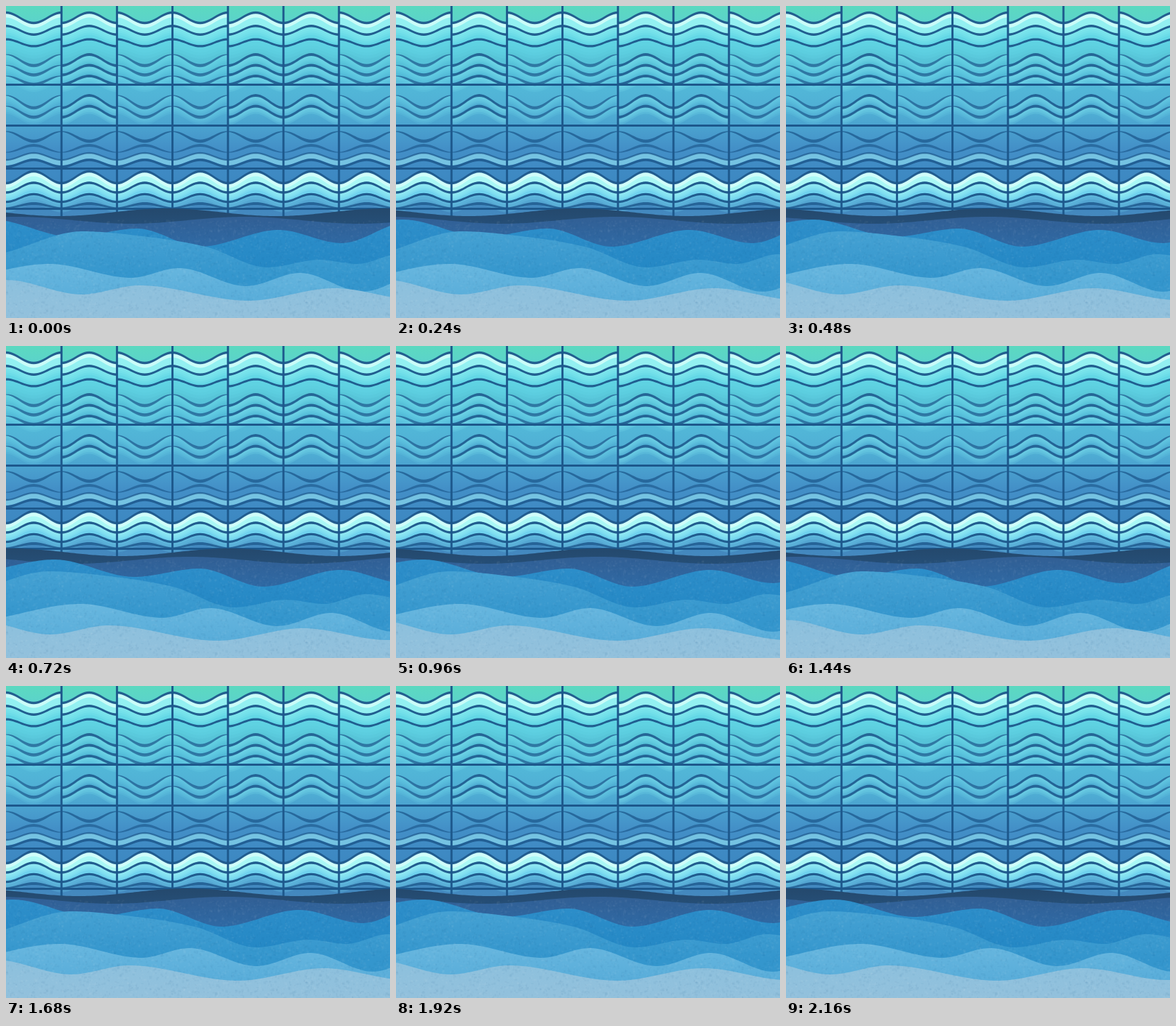
Write an HTML page with a canvas that moves like this. It is 555 px wide and 450 px high and loops after 2.4 s.

```html
<!DOCTYPE html>
<html lang="en">
<head>
<meta charset="utf-8">
<title>Waves</title>
<style>
  html, body { margin: 0; width: 100%; height: 100%; overflow: hidden; background: #4a9bcc; }
  canvas { display: block; }
</style>
</head>
<body>
<canvas id="stage" width="555" height="450"></canvas>
<script>
const W = 555, H = 450, STEP = 240, STEPS = 10;
const TILE = 80.2, INK = '#1d588c';
const ctx = document.getElementById('stage').getContext('2d');

let seed = 7;
const rnd = () => (seed = (seed * 16807) % 2147483647) / 2147483647;

function paint(draw) {
  const c = document.createElement('canvas');
  c.width = W;
  c.height = H;
  draw(c.getContext('2d'));
  return c;
}

function ramp(g, y0, y1, ...colors) {
  const r = g.createLinearGradient(0, y0, 0, y1);
  colors.forEach((c, i) => r.addColorStop(i / (colors.length - 1), c));
  return r;
}

// One cosine arch across a tile; positive amp rises in the middle.
function arch(col, y, amp) {
  const pts = [];
  for (let i = 0; i <= 24; i++) {
    const u = i / 24;
    pts.push([(col + u) * TILE, y + amp * Math.cos(2 * Math.PI * u)]);
  }
  return pts;
}

// Ribbon along a line, from lo(u) above it to hi(u) below it.
function ribbon(g, pts, lo, hi, color, alpha = 1) {
  const n = pts.length - 1;
  g.beginPath();
  pts.forEach(([x, y], i) => g.lineTo(x, y + lo(i / n)));
  [...pts].reverse().forEach(([x, y], i) => g.lineTo(x, y + hi(1 - i / n)));
  g.globalAlpha = alpha;
  g.fillStyle = color;
  g.fill();
  g.globalAlpha = 1;
}

const band = (g, pts, depth, color, alpha) =>
  ribbon(g, pts, () => 0, () => depth, color, alpha);

// Light under a line, fading downwards.
function glow(g, pts, depth, color, alpha) {
  for (let i = 1; i <= 4; i++) band(g, pts, depth * i / 4, color, alpha / 4);
}

const ink = (g, pts, width, alpha) =>
  ribbon(g, pts, () => -width / 2, () => width / 2, INK, alpha);

// Thick in the middle, thin at both ends.
function brush(g, pts, width, alpha) {
  const half = u => width * (.12 + .38 * Math.sin(Math.PI * u));
  ribbon(g, pts, u => -half(u), half, INK, alpha);
}

// A foaming crest over two thinner ripples, in steps of gap.
function crest(g, col, y, amp, gap, foam, water) {
  const ripple = i => arch(col, y + gap * i, amp * (1 - i * .17));
  band(g, ripple(0), gap, foam);
  band(g, ripple(1), gap, water);
  glow(g, ripple(1), gap * .7, foam, .8);
  glow(g, ripple(2), gap, water, .9);
  band(g, ripple(0), 7, '#d9fffa', .8);
  for (let i = 0; i < 3; i++) ink(g, ripple(i), 3.6 - i * .2, .95);
}

// Ripples inside a tile: inked where they rise, brushed where they sag.
function ripples(g, col, rise, y, amp, count) {
  for (let i = 0; i < count; i++) {
    const pts = arch(col, y + i * 14.5, rise * (amp - i));
    glow(g, pts, 11, '#7fe4ee', rise > 0 ? .75 : .4);
    if (rise > 0) ink(g, pts, 3.8, .88);
    else brush(g, pts, 4.6, .7);
  }
}

function shallows(g, col) {
  const pale = arch(col, 217, 5);
  brush(g, arch(col, 188, -7), 4.6, .75);
  brush(g, arch(col, 206, 5), 4, .65);
  band(g, pale, 8, '#7cc9e6', .9);
  ink(g, pale, 2.4, .7);
  ink(g, arch(col, 227, 5), 3.6, .85);
}

const wall = paint(g => {
  g.fillStyle = ramp(g, 0, 310, '#5cd9c0', '#5accd8', '#53bbd9', '#4fadd4', '#438fc7', '#3c87c1', '#4689be');
  g.fillRect(0, 0, W, H);
  for (let col = 0; col < 7; col++) {
    const rise = [1, 4, 5].includes(col) ? 1 : -1;
    ripples(g, col, rise, 78, 8, 3);
    ripples(g, col, rise, 138, 9, 2);
    shallows(g, col);
    crest(g, col, 17, rise * 7.5, 18, '#93f0f1', '#63d7e6');
    crest(g, col, 247, 8.5, 15, '#aaf8f5', '#6fd2ee');
    brush(g, arch(col, 288, 3), 4, .8);
  }
  g.fillStyle = INK;
  for (let i = 1; i < 7; i++) g.fillRect(i * TILE - 1.5, 0, 3, 310);
  for (const y of [113, 172, 234, 292]) g.fillRect(0, y - 1, W, 3);
});

const grain = paint(g => {
  for (let i = 0; i < 5000; i++) {
    g.fillStyle = rnd() < .5 ? 'rgba(255,255,255,.035)' : 'rgba(10,70,130,.04)';
    g.fillRect(rnd() * W, 308 + rnd() * 142, 1 + rnd() * 3, 1 + rnd() * 3);
  }
});

const swing = (y, amp, peak, period) =>
  x => y - amp * Math.cos(2 * Math.PI * (x - peak) / period);

// Smooth line through a few [x, y] points, level at each crest and trough.
function curve(...p) {
  const rate = i => (p[i + 1][1] - p[i][1]) / (p[i + 1][0] - p[i][0]);
  const slope = p.map((_, i) => {
    if (i === 0 || i === p.length - 1) return 0;
    const a = rate(i - 1), b = rate(i);
    return a * b > 0 ? 2 * a * b / (a + b) : 0;
  });
  return x => {
    let i = 0;
    while (i < p.length - 2 && x > p[i + 1][0]) i++;
    const [x0, y0] = p[i], [x1, y1] = p[i + 1], w = x1 - x0;
    const u = Math.min(1, Math.max(0, (x - x0) / w)), v = 1 - u;
    return y0 * v * v * (1 + 2 * u) + y1 * u * u * (1 + 2 * v)
      + w * u * v * (slope[i] * v - slope[i + 1] * u);
  };
}

// Back to front; neighbours drift in opposite directions.
const sea = [
  { drift: -90, y: 290, colors: ['#24486c', '#295b8b'], top: swing(297.5, 5.5, 323, 315) },
  { drift: 80, y: 303, colors: ['#325f94', '#2d70ae'], top: swing(309, 5, 265, 330) },
  { drift: -90, y: 310, colors: ['#2e8fca', '#2488c5'],
    top: curve([-60, 328], [70, 308], [185, 333], [280, 321], [371, 347], [484, 323], [575, 342], [670, 312]) },
  { drift: 48, y: 322, colors: ['#46a2d3', '#3496cd'],
    top: curve([-80, 360], [62, 325], [165, 334], [240, 347], [330, 377], [405, 366], [460, 372], [520, 358], [610, 372]) },
  { drift: -45, y: 370, colors: ['#68b7df', '#54aad8'],
    top: curve([-60, 398], [108, 372], [226, 392], [295, 378], [392, 404], [470, 385], [560, 412], [660, 380]) },
  { drift: 45, y: 395, colors: ['#8cc0dd', '#94c1dc'],
    top: curve([-45, 395], [64, 416], [148, 403], [305, 425], [430, 407], [550, 424]) }
];

function drawSwell({ drift, y, colors, top }, k) {
  ctx.beginPath();
  ctx.moveTo(0, H);
  for (let x = 0; x <= W; x += 3) ctx.lineTo(x, top(x - drift * k));
  ctx.lineTo(W, H);
  ctx.fillStyle = ramp(ctx, y, y + 70, ...colors);
  ctx.fill();
}

function frame(now) {
  const n = Math.floor(now / STEP) % STEPS;
  const k = 1 - Math.abs(3 - n % 6) / 3;
  ctx.drawImage(wall, 0, 0);
  sea.forEach(s => drawSwell(s, 1 - k));
  ctx.drawImage(grain, 0, 0);
  requestAnimationFrame(frame);
}
frame(0);
</script>
</body>
</html>
```
